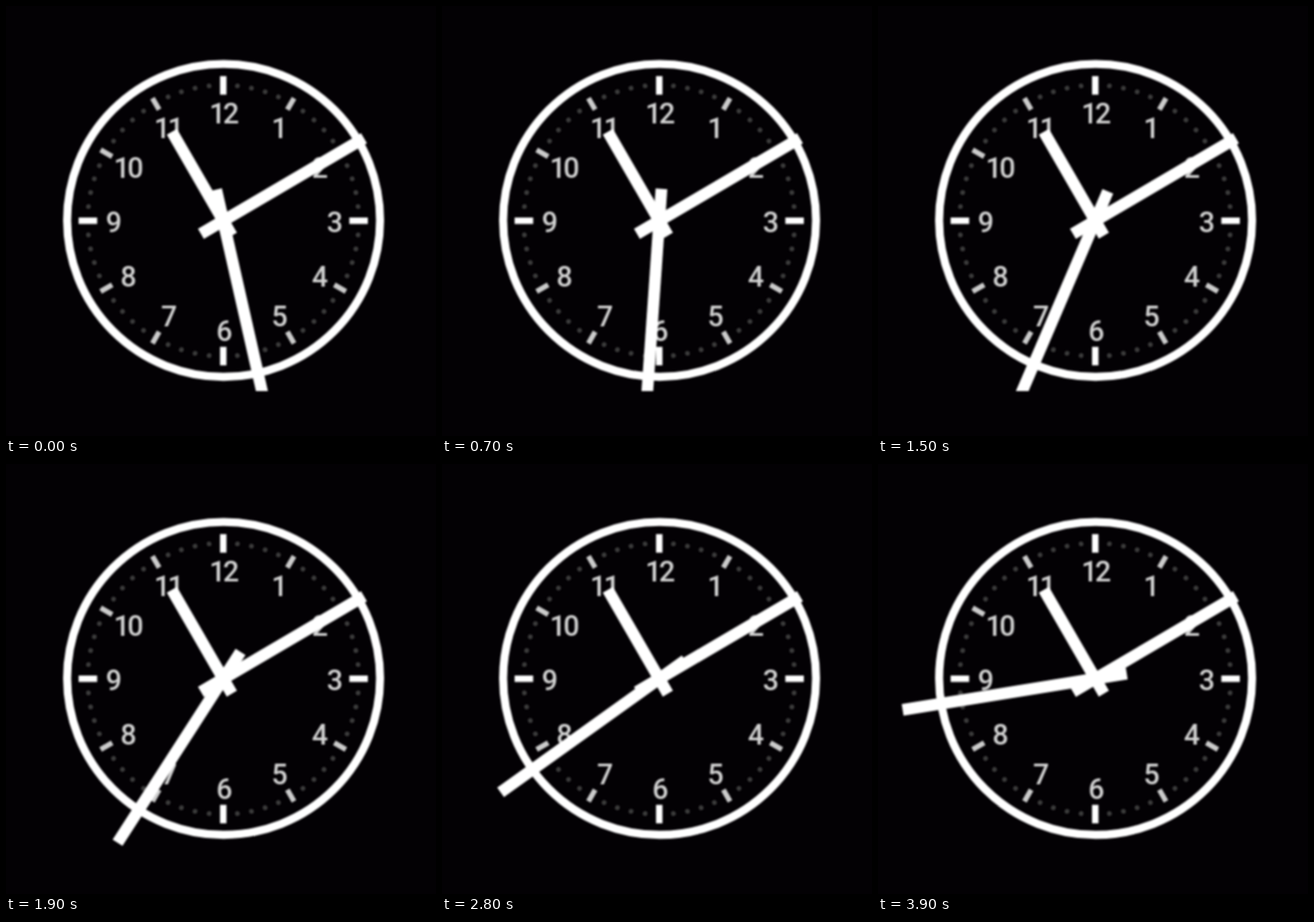
Animation, 498 px wide and 498 px high, one loop 4 s. Source, as an HTML page:

```html
<!DOCTYPE html>
<html lang="en">
<head>
<meta charset="utf-8">
<title>Clock</title>
<style>
  html, body { margin: 0; width: 100%; height: 100%; overflow: hidden; background: #030104; }
  svg { display: block; width: 498px; height: 498px; filter: blur(1.2px); }
  text { font: 500 33px Roboto, sans-serif; letter-spacing: -3px; text-anchor: middle; fill: #d2d2d2; }
</style>
</head>
<body>
<svg viewBox="0 0 498 498">
  <clipPath id="stage"><rect width="498" height="446"/></clipPath>
  <circle cx="252" cy="248.3" r="181.2" fill="none" stroke="#fff" stroke-width="9.4"/>
  <g id="dial"></g>
  <g id="hands" clip-path="url(#stage)"></g>
</svg>
<script>
const CX = 251.6, CY = 248.7;
const STEP = 100, LOOP = 4000, START_ANGLE = 167.2, STEP_ANGLE = 2.4;
const HAND_WIDTH = 13.6;
const dial = document.getElementById('dial');
const hands = document.getElementById('hands');

function add(parent, tag, attrs, text = '') {
  const el = document.createElementNS('http://www.w3.org/2000/svg', tag);
  for (const name in attrs) el.setAttribute(name, attrs[name]);
  el.textContent = text;
  return parent.appendChild(el);
}

const turn = angle => `translate(${CX} ${CY}) rotate(${angle})`;

// Radial bar from radius `from` to radius `to`; a negative radius lies behind the centre.
const bar = (parent, angle, from, to, width, stroke = '#fff') =>
  add(parent, 'line', { y1: -from, y2: -to, 'stroke-width': width, stroke, transform: turn(angle) });

for (let minute = 0; minute < 60; minute++) {
  const angle = minute * 6;
  if (minute % 15 === 0) bar(dial, angle, 146, 167.5, 7.5);
  else if (minute % 5 === 0) bar(dial, angle, 148.5, 164, 6, '#ccc');
  else add(dial, 'circle', { cy: -157, r: 2.8, fill: '#3c3c3c', transform: turn(angle) });
}

for (let hour = 1; hour <= 12; hour++) {
  const a = hour * Math.PI / 6;
  add(dial, 'text', { x: 251.3 + 128 * Math.sin(a), y: 262.2 - 126 * Math.cos(a) }, hour);
}

bar(hands, 330, -20, 119, HAND_WIDTH);
bar(hands, 59.6, -30, 189, HAND_WIDTH);
const secondHand = bar(hands, START_ANGLE, -37, 226, HAND_WIDTH);

function draw() {
  const step = Math.floor(performance.now() % LOOP / STEP);
  secondHand.setAttribute('transform', turn(START_ANGLE + step * STEP_ANGLE));
  requestAnimationFrame(draw);
}
draw();
</script>
</body>
</html>
```
